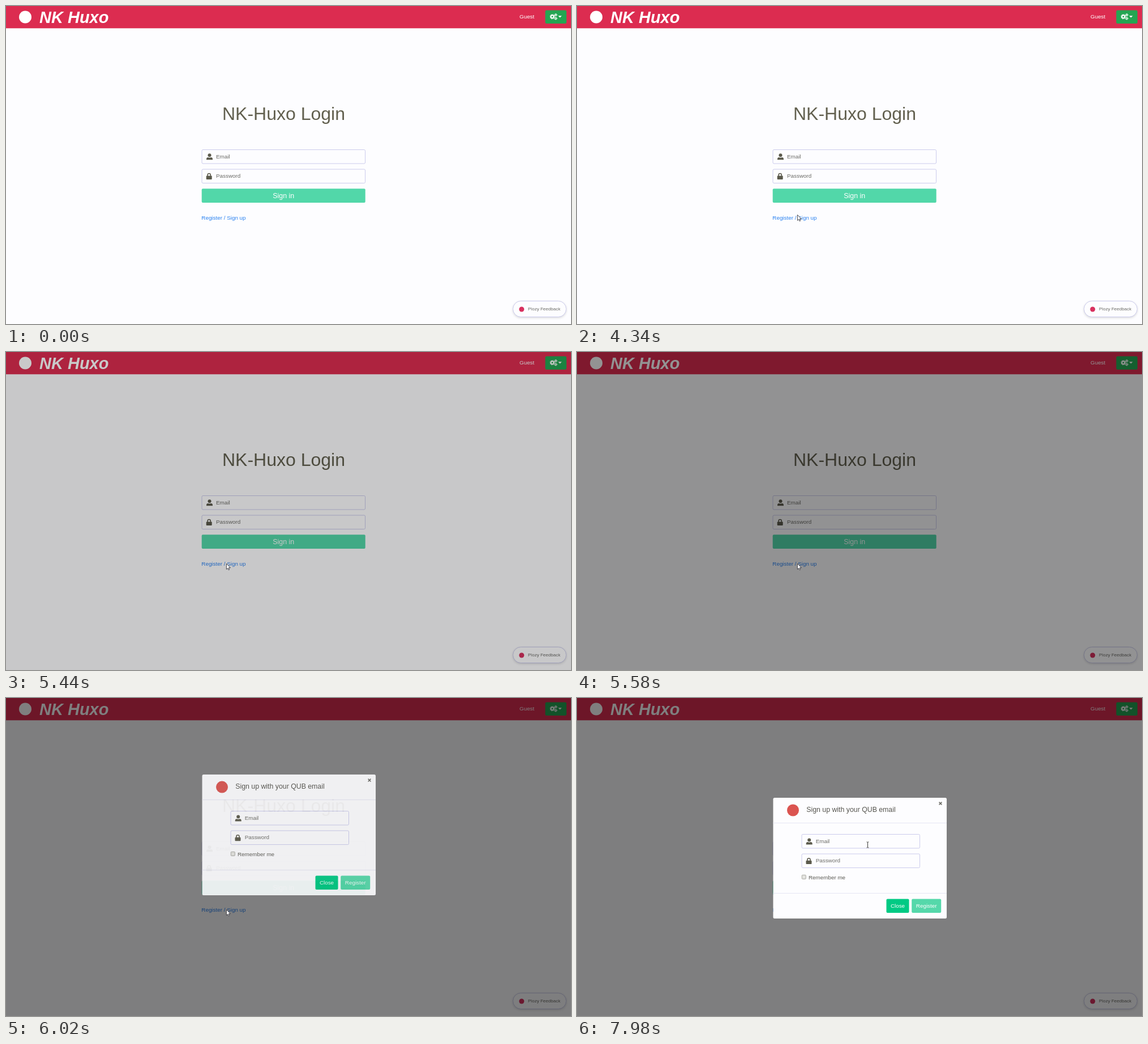
Animation of 998 by 561 pixels, one loop 8000 ms. Source, as an HTML page:

```html
<!DOCTYPE html>
<html lang="en">
<head>
<meta charset="utf-8">
<title>Login</title>
<style>
html, body { margin: 0; width: 100%; height: 100%; overflow: hidden; background: #fdfdff; }
svg { display: block; width: 100vw; height: 100vh; }
text { font-family: "Liberation Sans", Arial, sans-serif; font-size: 9.85px; fill: #6b6b66; white-space: pre; }
.dark { fill: #62604f; }
.white { fill: #fff; }
.mid { text-anchor: middle; }
.box { fill: #fdfdff; stroke: #cbcbec; stroke-width: 1; }
.rule { stroke: #e6e6f4; stroke-width: 1; }
.cursor { fill: #fff; stroke: #34343c; stroke-width: .9; stroke-linejoin: round; }
#link { fill: #2b82f0; }
#link.over { fill: #1c5ba8; }
#line { stroke: #1c5ba8; stroke-width: .8; }
</style>
</head>
<body>
<svg viewBox="0 0 998 561">
  <defs>
    <g id="user" fill="#5b5a4c">
      <circle cx="5.5" cy="3" r="3"/>
      <path d="M0 11V9.6Q0 6.6 3 6.6Q5.5 7.7 8 6.6Q11 6.6 11 9.6V11Z"/>
    </g>
    <g id="lock">
      <path d="M2.4 6V3.6a2.6 2.6 0 0 1 5.2 0V6" fill="none" stroke="#5b5a4c" stroke-width="1.6"/>
      <rect y="5" width="10" height="6.4" rx="1" fill="#5b5a4c"/>
    </g>
    <filter id="soft" x="-20%" y="-40%" width="140%" height="200%">
      <feGaussianBlur stdDeviation="2"/>
    </filter>
  </defs>

  <rect width="998" height="561" fill="#fdfdff"/>
  <rect width="998" height="39.3" fill="#dc2c50"/>
  <circle cx="34" cy="19.5" r="11" fill="#fff"/>
  <text x="59" y="30" class="white" style="font-size:29px;font-weight:bold;font-style:italic">NK Huxo</text>
  <text x="907" y="22" class="white">Guest</text>
  <rect x="952.5" y="7.5" width="37.5" height="23.5" rx="2.5" fill="#24a552"/>
  <g fill="none" stroke="#fff">
    <circle cx="965" cy="18.8" r="2.5" stroke-width="2"/>
    <circle cx="965" cy="18.8" r="3.9" stroke-width="1.2" stroke-dasharray="1.53 1.53"/>
    <circle cx="971" cy="15.7" r="1.4" stroke-width="1.2"/>
    <circle cx="971" cy="15.7" r="2.3" stroke-width=".9" stroke-dasharray="1.2 1.2"/>
    <circle cx="971" cy="21.9" r="1.4" stroke-width="1.2"/>
    <circle cx="971" cy="21.9" r="2.3" stroke-width=".9" stroke-dasharray="1.2 1.2"/>
  </g>
  <path d="M975.3 17.3H981.7L978.5 20.6Z" fill="#fff"/>

  <text x="382" y="201" class="dark" style="font-size:32px">NK-Huxo Login</text>
  <rect class="box" x="346" y="253.5" width="288.5" height="24.5" rx="2"/>
  <use href="#user" x="354" y="260.3"/>
  <text x="371" y="269">Email</text>
  <rect class="box" x="346" y="288" width="288.5" height="24.5" rx="2"/>
  <use href="#lock" x="353.7" y="294.5"/>
  <text x="371" y="303.3">Password</text>
  <rect x="345.7" y="322.3" width="289" height="24.7" rx="2" fill="#52d7a9"/>
  <text x="490.2" y="339" class="white mid" style="font-size:12.4px">Sign in</text>
  <text id="link" x="345.3" y="377">Register / Sign up</text>
  <path id="line" d="M345.3 378.5H423.7"/>

  <rect x="895.5" y="522" width="94" height="28" rx="14" fill="#000" opacity=".16" filter="url(#soft)"/>
  <rect class="box" x="895.5" y="520.5" width="94" height="28" rx="14"/>
  <circle cx="910.8" cy="535" r="4.5" fill="#d8315f"/>
  <text x="922" y="537.2" style="font-size:8.05px">Plozy Feedback</text>

  <rect id="shade" width="998" height="561" opacity="0"/>

  <g id="modal">
    <rect x="346.5" width="306.5" height="213" rx="2.5" fill="#fdfdff"/>
    <circle cx="381.5" cy="22" r="10.5" fill="#db5450"/>
    <text x="405.3" y="25" style="font-size:12.32px;fill:#56554f">Sign up with your QUB email</text>
    <path d="M639.6 7.6L644.4 12.4M644.4 7.6L639.6 12.4" stroke="#6c6c66" stroke-width="1.6"/>
    <path class="rule" d="M346.5 44.5H653M346.5 168.5H653"/>
    <rect class="box" x="397" y="64.5" width="208.5" height="24.5" rx="2"/>
    <use href="#user" x="404.7" y="71.5"/>
    <text x="421.7" y="80">Email</text>
    <rect class="box" x="397" y="99" width="208.5" height="24.5" rx="2"/>
    <use href="#lock" x="404.5" y="105.7"/>
    <text x="421.7" y="114.4">Password</text>
    <rect x="397.3" y="136.3" width="7" height="7" rx="1" fill="#e4e4e0" stroke="#999990" stroke-width=".8"/>
    <text x="409" y="143.8" style="fill:#5c5b55">Remember me</text>
    <rect x="546.5" y="178.5" width="40" height="24.5" rx="2" fill="#00ca84"/>
    <text x="566.5" y="194" class="white mid">Close</text>
    <rect x="591.2" y="178.5" width="52" height="24.5" rx="2" fill="#55d8aa"/>
    <text x="617.2" y="194" class="white mid">Register</text>
  </g>

  <g id="pointer">
    <path id="arrow" class="cursor" d="M.4 .4V10.4L2.7 8.3 4.2 11.6 5.7 10.9 4.3 7.7H7.4Z"/>
    <path id="hand" class="cursor" d="M-1 8V1.2Q-1 .3 0 .3T1 1.2V5.2Q2.9 4.6 3.2 5.8Q5 5.3 5.2 6.5Q6.8 6.2 6.8 7.6V10.4Q6.8 12 5.6 13V14.4H-.4V13.4L-3.4 9.2Q-4 7.9-2.9 7.4Q-2.2 7.1-1 8.6Z"/>
    <path id="beam" d="M-1.9 -5H-.6L0 -4.5L.6 -5H1.9M0 -4.5V4.5M-1.9 5H-.6L0 4.5L.6 5H1.9" fill="none" stroke="#3c3c38" stroke-width="1"/>
  </g>
</svg>
<script>
const $ = id => document.getElementById(id);
const clamp = v => Math.min(1, Math.max(0, v));
const span = (t, a, b) => clamp((t - a) / (b - a));
const smooth = p => p * p * (3 - 2 * p);
const show = (id, on) => $(id).setAttribute("visibility", on ? "visible" : "hidden");

// [time, x, y, eased]
const path = [
  [1380, 568, 411], [1540, 568, 411], [2360, 426, 386, true],
  [2540, 402.7, 377], [3080, 389.5, 370], [4320, 389.5, 370],
  [4340, 389, 368], [4620, 389.5, 372], [4780, 389.5, 372],
  [4900, 389, 373], [6450, 389, 373], [7600, 513.5, 259, true]
];
const holds = [[6040, 6140], [6880, 6980], [7720, 7820]];

function place(t) {
  let i = 1;
  while (i < path.length - 1 && t > path[i][0]) i++;
  const a = path[i - 1], b = path[i];
  let p = span(t, a[0], b[0]);
  if (b[3]) p = smooth(p);
  return [a[1] + (b[1] - a[1]) * p, a[2] + (b[2] - a[2]) * p];
}

// cubic-bezier(0, 0, .58, 1)
function easeOut(x) {
  let lo = 0, hi = 1;
  for (let i = 0; i < 20; i++) {
    const u = (lo + hi) / 2;
    if (u * u * (1.74 - .74 * u) < x) lo = u; else hi = u;
  }
  return smooth(lo);
}

function draw(t) {
  for (const [a, b] of holds) if (t > a && t < b) t = a;

  $("shade").setAttribute("opacity", .5 * span(t, 5300, 5633));
  const top = 43 + 133 * easeOut(span(t, 5635, 6396));
  $("modal").setAttribute("opacity", span(t, 5634, 6063));
  $("modal").setAttribute("transform", `translate(0 ${top})`);

  const [x, y] = place(t);
  const over = t >= 2440 && t < 4340 || t >= 4380 && t < 5300;
  const typing = t > 6450 && x > 397 && y < 265;
  $("pointer").setAttribute("transform", `translate(${x} ${y})`);
  show("arrow", t >= 1380 && !over && !typing);
  show("hand", over);
  show("beam", typing);
  show("line", over);
  $("link").setAttribute("class", over ? "over" : "");
}

const start = performance.now();
function tick() {
  draw((performance.now() - start) % 8000);
  requestAnimationFrame(tick);
}
tick();
</script>
</body>
</html>
```
